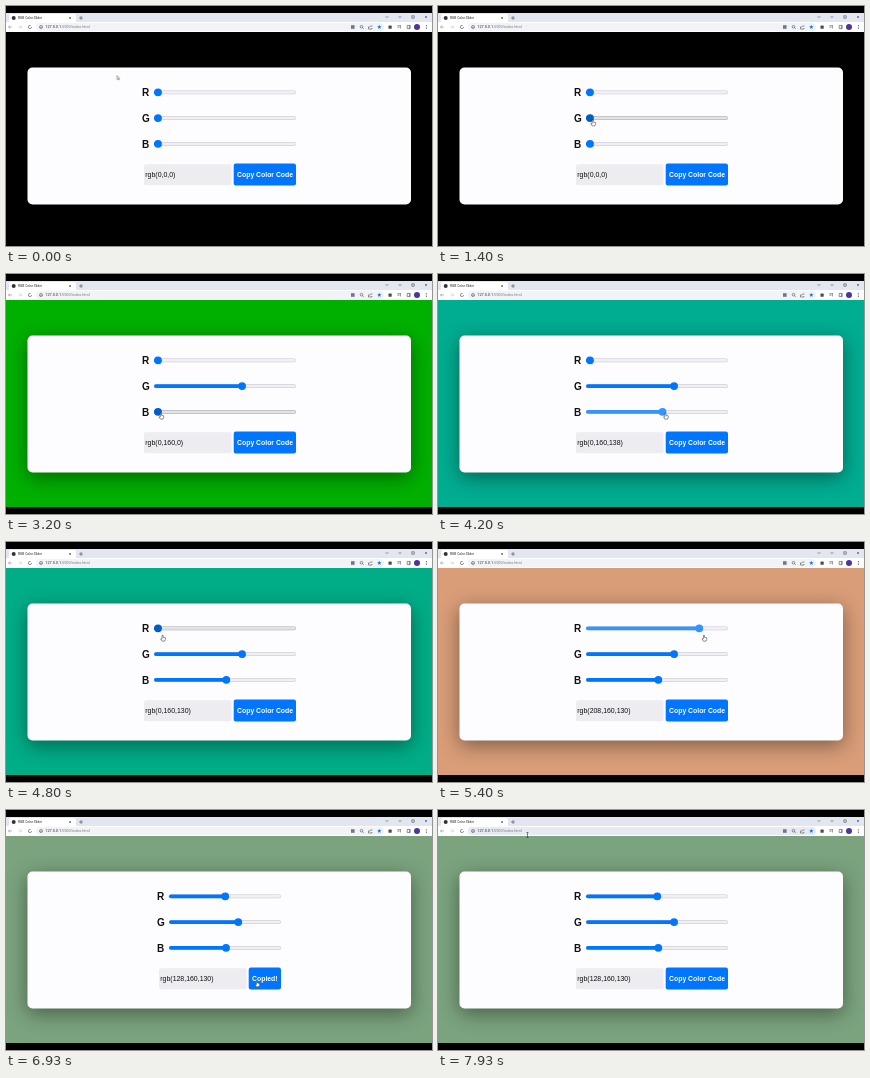
These frames come from a looping animation (426x240 px, 8 s). An HTML page with a canvas:

```html
<!DOCTYPE html>
<html lang="en">
<head>
<meta charset="utf-8">
<title>RGB Color Slider</title>
<style>
  html, body { margin: 0; width: 100%; height: 100%; overflow: hidden; background: #000; }
  canvas { display: block; width: 426px; height: 240px; }
</style>
</head>
<body>
<canvas id="stage"></canvas>
<script>
const W = 426, H = 240, LOOP = 8000;
const PAGE_TOP = 26, PAGE_BOTTOM = 233;
const SANS = '"Liberation Sans", Arial, sans-serif';
const UI = 'Roboto, "Open Sans", sans-serif';
const INK = '#4a4d52', BLUE = '#0075ff', HOVER = '#005cc8', ACTIVE = '#3793ff';
const COPY_AT = 6600, COPY_MS = 1000, LEAVE_AT = 7050, URL_AT = 7800;

const canvas = document.getElementById('stage');
const ctx = canvas.getContext('2d');
const dpr = window.devicePixelRatio || 1;
canvas.width = W * dpr;
canvas.height = H * dpr;

// Each slider rests at 0, then is dragged to its values between grab and drop.
const red = { label: 'R', row: 0, grab: 4880, drop: 6100, grip: [4.7, 7],
  drag: [{ to: 208, by: 5360 }, { to: 128, from: 5500, by: 6000 }] };
const green = { label: 'G', row: 1, grab: 1500, drop: 2650, grip: [2.8, 2],
  drag: [{ to: 160, by: 2500 }] };
const blue = { label: 'B', row: 2, grab: 3250, drop: 4420, grip: [3, 1.5],
  drag: [{ to: 138, by: 3950 }, { to: 130, from: 4230, by: 4400 }] };
const sliders = [red, green, blue];
const order = [green, blue, red];

const lerp = (a, b, k) => a + (b - a) * k;
const within = (t, a, b) => t >= a && t < b;

function ease(t, from, to) {
  const p = Math.min(1, Math.max(0, (t - from) / (to - from)));
  return p * p * (3 - 2 * p);
}

function valueAt(s, t) {
  return s.drag.reduce((v, d) => lerp(v, d.to, ease(t, d.from || s.grab, d.by)), 0);
}

const rowY = s => 86.3 + s.row * 25.75;
const thumbX = (v, inset = 0) => lerp(152 + inset, 286 - inset, v / 255);
const gripAt = (s, t) => [thumbX(valueAt(s, t)) + s.grip[0], rowY(s) + s.grip[1]];

// The pointer follows a held thumb and glides between the stops.
function pointerAt(t) {
  let pos = [111, 69.5], free = 350;
  const glide = (target, arrive) => {
    const k = ease(t, free, arrive);
    pos = pos.map((v, i) => lerp(v, target[i], k));
  };
  for (const s of order) {
    glide(gripAt(s, t), s.grab - 120);
    free = s.drop;
  }
  glide([251, 171], COPY_AT - 100);
  free = LEAVE_AT;
  glide([89.5, 25], URL_AT);
  return pos;
}

function stateAt(s, t) {
  if (within(t, s.grab, s.drop)) return 'active';
  return within(t, s.grab - 250, s.drop + 60) ? 'hover' : '';
}

function rect(x, y, w, h, color, r = 0) {
  ctx.fillStyle = color;
  ctx.beginPath();
  ctx.roundRect(x, y, w, h, r);
  ctx.fill();
}

function circle(x, y, r, color) {
  ctx.fillStyle = color;
  ctx.beginPath();
  ctx.arc(x, y, r, 0, Math.PI * 2);
  ctx.fill();
}

function ring(x, y, r, end = Math.PI * 2) {
  ctx.strokeStyle = INK;
  ctx.lineWidth = 0.6;
  ctx.beginPath();
  ctx.arc(x, y, r, 0, end);
  ctx.stroke();
}

function glyph(x, y, path, color = INK, fill) {
  const p = new Path2D(path);
  ctx.save();
  ctx.translate(x, y);
  if (fill) {
    ctx.fillStyle = fill;
    ctx.fill(p);
  }
  ctx.strokeStyle = color;
  ctx.lineWidth = 0.6;
  ctx.stroke(p);
  ctx.restore();
}

function text(str, x, y, size, color, weight = 400, family = SANS) {
  ctx.font = `${weight} ${size}px ${family}`;
  ctx.fillStyle = color;
  ctx.fillText(str, x, y);
  return x + ctx.measureText(str).width;
}

function star(x, y, r, color) {
  ctx.fillStyle = color;
  ctx.beginPath();
  for (let i = 0; i < 10; i++) {
    const a = (i / 5 - 0.5) * Math.PI, d = i % 2 ? r * 0.45 : r;
    ctx.lineTo(x + Math.cos(a) * d, y + Math.sin(a) * d);
  }
  ctx.fill();
}

const CROSS = 'M-1-1L1 1M1-1L-1 1';

function tabStrip() {
  rect(0, 7, W, 9.5, '#e1e6f0');
  rect(3, 8, 67, 9, '#fff', [2, 2, 0, 0]);
  circle(7.7, 12, 2, '#333');
  text('RGB Color Slider', 12, 13.2, 3.3, '#222', 400, UI);
  glyph(64, 12, CROSS);
  glyph(75, 12, 'M-2 0H2M0-2V2');
  glyph(381, 11, 'M-1.2-.7L0 .6L1.2-.7');
  glyph(394, 11, 'M-1.4 0H1.4');
  glyph(407, 11, 'M-1.2-1.2H1.2V1.2H-1.2Z');
  glyph(420, 11, CROSS);
}

function toolbar(hover) {
  const y = 21;
  rect(0, 16, W, PAGE_TOP - 16, '#fff');
  glyph(4.2, y, 'M1.7 0H-1.7M0-1.5L-1.7 0L0 1.5', '#8a8d92');
  glyph(14, y, 'M-1.7 0H1.7M0-1.5L1.7 0L0 1.5', '#c4c7cb');
  ring(24, y, 1.6, 5.2);
  rect(30, 17, 348, 8, hover ? '#e7eaf1' : '#f1f3f7', 4);
  ring(35, y, 1.5);
  glyph(35, y, 'M0-.3V1');
  const end = text('127.0.0.1', 39.3, 22.4, 3.8, '#303236', 400, UI);
  text(':5500/index.html', end, 22.4, 3.8, '#777b80', 400, UI);

  rect(345, 19.2, 3.6, 3.6, '#6a7894');
  ring(355.5, 20.7, 1.3);
  glyph(357, 22.2, 'M-.6-.6L.7.7');
  glyph(364.5, y, 'M-2-.5V2H1.5V1M-1 .5L0-1H2');
  star(373.3, y, 2.3, '#1a73e8');
  rect(382.5, 19.6, 3.2, 3.2, INK, 0.6);
  glyph(393, y, 'M-1.6-1.3H2M-1.6.2H.4M1.4-1.3V1.5');
  glyph(402.7, y, 'M-1.5-1.6H1.5V1.6H-1.5ZM.7-1.6V1.6');
  circle(411, y, 3, '#50349c');
  for (let i = -1; i <= 1; i++) circle(420.3, y + i * 1.6, 0.5, INK);
}

function page(rgb) {
  const [r, g, b] = rgb;
  const luma = 0.3 * r + 0.59 * g + 0.11 * b;
  const vivid = rgb.map(c => Math.max(0, Math.round(lerp(luma, c, 1.25))));
  ctx.save();
  ctx.beginPath();
  ctx.rect(0, PAGE_TOP, W, PAGE_BOTTOM - PAGE_TOP);
  ctx.clip();
  rect(0, PAGE_TOP, W, H, `rgb(${vivid})`);
  ctx.shadowColor = 'rgba(0,0,0,.42)';
  ctx.shadowBlur = 20 * dpr;
  ctx.shadowOffsetY = 5 * dpr;
  rect(21.5, 61.5, 383.5, 137, '#fdfdff', 5);
  ctx.restore();
}

function slider(s, value, state, inset) {
  const x = 148 + inset, w = 142 - inset * 2, y = rowY(s);
  const thumb = thumbX(value, inset);
  const hover = state === 'hover';
  const accent = { hover: HOVER, active: ACTIVE }[state] || BLUE;
  text(s.label, 136 + inset, y + 3.7, 10, '#111', 700);
  rect(x, y - 1.9, w, 3.8, hover ? '#a4a6aa' : '#c6c2d0', 1.9);
  rect(x + 0.4, y - 1.4, w - 0.8, 2.8, hover ? '#e2e3e6' : '#f0eff4', 1.4);
  rect(x, y - 1.9, thumb - x, 3.8, accent, 1.9);
  circle(thumb, y, 3.9, accent);
}

function copyRow(rgb, copied, inset) {
  rect(138 + inset, 158.3, 87.5, 21, '#ececf1', 2);
  text(`rgb(${rgb})`, 139.3 + inset, 171, 6.95, '#111');
  const x = 227.7 + inset, right = 290 - inset;
  rect(x, 157.5, right - x, 22, BLUE, 2.2);
  text(copied ? 'Copied!' : 'Copy Color Code', x + 3.4, 171, 6.85, '#fff', 700);
}

function pointer(t) {
  const [x, y] = pointerAt(t);
  const overButton = within(t, COPY_AT - 180, LEAVE_AT + 110);
  if (t >= URL_AT - 20) {
    glyph(x, y, 'M0-2.5V2.5M-1-2.5H1M-1 2.5H1', '#333');
  } else if (overButton || sliders.some(s => stateAt(s, t))) {
    glyph(x, y, 'M-.6 0H.4L.5 2L2.7 2.5V4.2L2 5.8H-.6L-2 3.6L-.6 3.5Z', '#444', '#fff');
  } else {
    glyph(x, y, 'M0 0V4L1 3.2L1.7 4.6L2.2 4.3L1.6 3H2.8Z', '#777', '#fff');
  }
}

function draw(t) {
  const rgb = sliders.map(s => Math.round(valueAt(s, t)));
  const copied = within(t, COPY_AT, COPY_AT + COPY_MS);
  const inset = copied ? 15 : 0;

  ctx.setTransform(dpr, 0, 0, dpr, 0, 0);
  rect(0, 0, W, H, '#000');
  tabStrip();
  toolbar(t >= URL_AT - 20);
  page(rgb);
  sliders.forEach((s, i) => slider(s, rgb[i], stateAt(s, t), inset));
  copyRow(rgb, copied, inset);
  pointer(t);
}

const start = performance.now();
function tick() {
  draw((performance.now() - start) % LOOP);
  requestAnimationFrame(tick);
}
tick();
</script>
</body>
</html>
```
